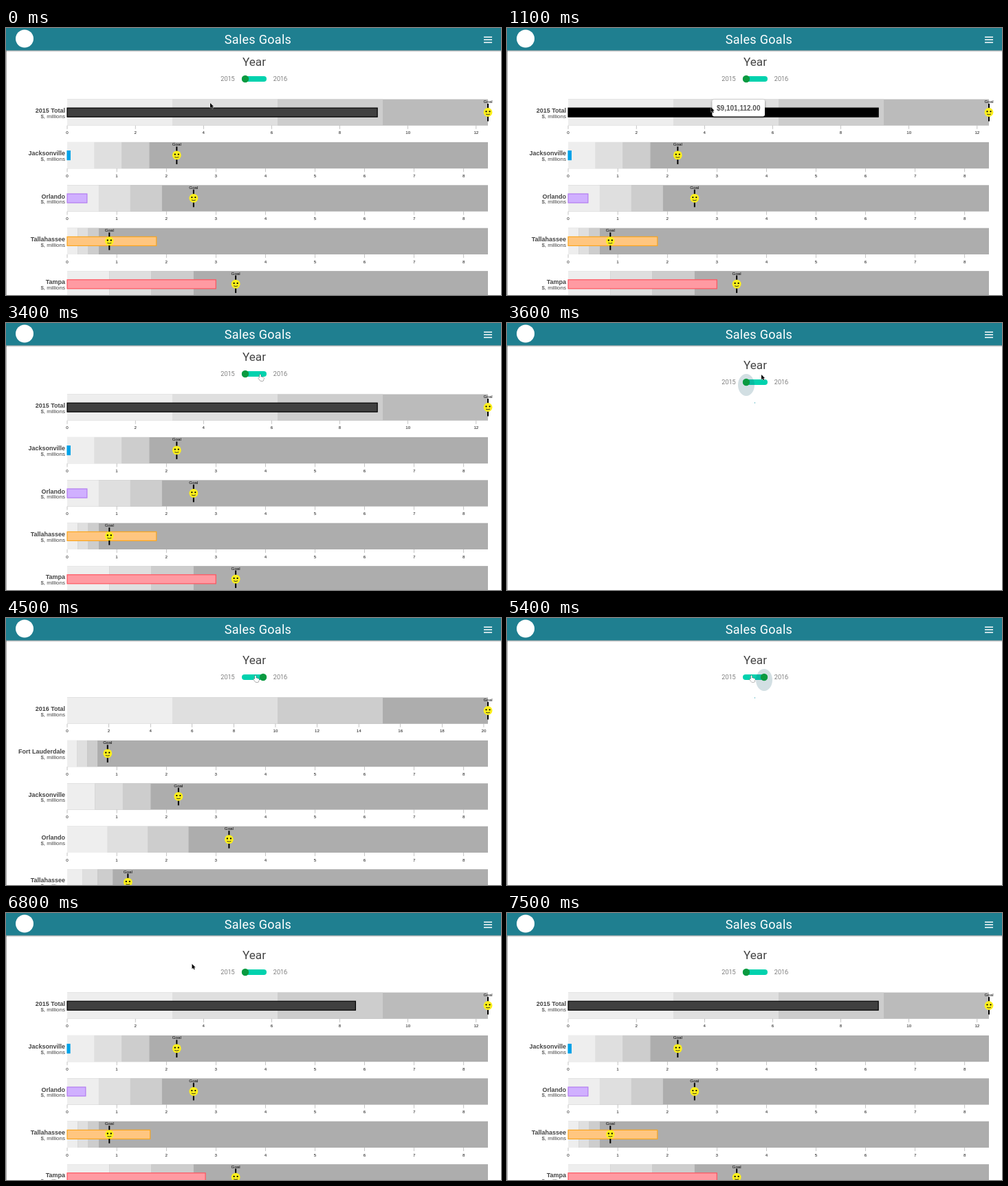
Write an HTML page that moves like this. It is 720x388 px and loops after 7600 ms.

```html
<!DOCTYPE html>
<html lang="en">
<head>
<meta charset="utf-8">
<title>Sales Goals</title>
<style>
  html, body { margin: 0; width: 100%; height: 100%; overflow: hidden; background: #fff; }
  svg { display: block; width: 720px; height: 388px; }
  text { font-family: "Liberation Sans", Arial, sans-serif; }
  .roboto { font-family: Roboto, sans-serif; }
  .mid { text-anchor: middle; }
  .end { text-anchor: end; }
  .name { font-size: 9px; font-weight: bold; fill: #444; }
  .unit { font-size: 8px; fill: #444; }
  .tick { font-size: 6.2px; fill: #111; }
  .tip { font-size: 10px; font-weight: bold; fill: #555; }
</style>
</head>
<body>
<svg viewBox="0 0 720 388">
  <defs>
    <linearGradient id="shade" x2="0" y2="1">
      <stop stop-color="#000" stop-opacity=".4"/>
      <stop offset="1" stop-color="#000" stop-opacity="0"/>
    </linearGradient>
    <filter id="lift" x="-20%" y="-40%" width="140%" height="200%">
      <feDropShadow dx="0" dy="1" stdDeviation="1.6" flood-opacity=".55"/>
    </filter>
  </defs>
  <g id="page"></g>
  <rect y="33" width="1" height="355" fill="#aaa"/>
  <rect y="32" width="720" height="3" fill="url(#shade)"/>
  <rect width="720" height="32.5" fill="#1f7f90"/>
  <circle cx="27" cy="15.5" r="13" fill="#fff"/>
  <text class="roboto mid" x="366.5" y="22.5" font-size="18" letter-spacing=".3" fill="#fff">Sales Goals</text>
  <path d="M695 13.3h12M695 17.1h12M695 20.9h12" stroke="#fff" stroke-width="1.5"/>
  <g id="pointer"></g>
</svg>
<script>
const LOOP = 7600, STEP = 100;
const LEFT = 89, WIDTH = 612, PITCH = 62.4, CITY_UNIT = 72.1;
const BANDS = ['#eee', '#dfdfdf', '#cdcdcd'];
const page = document.getElementById('page');
const pointer = document.getElementById('pointer');

const COLORS = {
  total: ['#404040', '#000'],
  Jacksonville: ['#00a2e8', '#00a2e8'],
  Orlando: ['#d0b0ff', '#b27cf0'],
  Tallahassee: ['#ffc680', '#fba51f'],
  Tampa: ['#ff9aa2', '#ff5560'],
};

// Each row: name, goal, sales (in millions)
const YEARS = {
  2015: [['2015 Total', 12.345678, 9.101112], ['Jacksonville', 2.21, .06],
    ['Orlando', 2.55, .4], ['Tallahassee', .85, 1.8], ['Tampa', 3.4, 3]],
  2016: [['2016 Total', 20.2, 0], ['Fort Lauderdale', .815, 0],
    ['Jacksonville', 2.245, 0], ['Orlando', 3.265, 0], ['Tallahassee', 1.225, 0]],
};

// Cursor path: time, x, y
const PATH = [[0, 297, 109], [500, 297, 109], [800, 296.5, 115], [1500, 296.5, 115],
  [2200, 700, 122], [2800, 700, 122], [3300, 370, 75], [3600, 370, 75], [4000, 363, 84],
  [5200, 363, 84], [5900, 286, 83], [6600, 286, 83], [7300, 120, -14], [LOOP, 120, -14]];

// Toggle clicks: when the page empties, when the new chart shows
const LOADS = [{ from: 3500, to: 4300 }, { from: 5300, to: 6000 }];
const GROW = 6060, GROW_TIME = 1000;

const clamp = v => Math.max(0, Math.min(1, v));
const ease = v => v < .5 ? 4 * v ** 3 : 1 - 4 * (1 - v) ** 3;
const rect = (x, y, w, h, fill, extra = '') =>
  `<rect x="${x}" y="${y}" width="${w}" height="${h}" fill="${fill}" ${extra}/>`;
const text = (cls, x, y, str, extra = '') =>
  `<text class="${cls}" x="${x}" y="${y}" ${extra}>${str}</text>`;

function cursorAt(t) {
  const i = PATH.findIndex(p => p[0] > t);
  const [t0, x0, y0] = PATH[i - 1], [t1, x1, y1] = PATH[i];
  const k = ease((t - t0) / (t1 - t0));
  return { x: x0 + (x1 - x0) * k, y: y0 + (y1 - y0) * k };
}

function goalMarker(x, y) {
  return text('mid', x, y + 5.5, 'Goal', 'font-size="6.2"') +
    rect(x - 1, y + 6.5, 2, 25.5, '#000') +
    `<g transform="translate(${x} ${y + 19})"><circle r="6.4" fill="#fdf01c"/>
      <circle cx="-2.5" cy="-1.2" r="1.15"/><circle cx="2.5" cy="-1.2" r="1.15"/>
      <path d="M-3 2.6Q0 4.2 3 2.6" fill="none" stroke="#222" stroke-width=".9"/></g>`;
}

function chartRow([name, goal, sales], i, top, grown, hover) {
  const total = i === 0, y = top + i * PITCH;
  const unit = total ? WIDTH / goal : CITY_UNIT, quarter = goal * unit / 4;
  let out = rect(LEFT, y, WIDTH, 38.3, name === '2015 Total' ? '#bbb' : '#adadad');
  BANDS.forEach((c, n) => out += rect(LEFT + n * quarter, y, quarter, 38.3, c));
  for (let v = 0; v * unit <= WIDTH; v += total ? 2 : 1) {
    const x = LEFT + v * unit;
    out += rect(x - .25, y + 38.3, .5, 5, '#888') + text('tick mid', x, y + 50.8, v);
  }
  out += text('name end', 86, y + 19.2, name) + text('unit end', 86, y + 27, '$, millions');
  const w = sales * unit * grown;
  if (w > 0) {
    const [fill, line] = COLORS[total ? 'total' : name];
    out += rect(LEFT, y + 12.7, w, 13, hover && total ? '#000' : fill, `stroke="${line}" stroke-width="1.2"`);
  }
  return out + goalMarker(LEFT + goal * unit, y);
}

function toggle(y, knob, ripple) {
  const halo = ripple.alpha > 0
    ? `<ellipse cx="${ripple.x}" cy="${y + 4}" rx="12" ry="16" fill="#1f5f75" opacity="${ripple.alpha}"/>` : '';
  const label = 'font-size="9.2" font-weight="300" fill="#444"';
  return text('roboto mid', 361, y - 19.5, 'Year', 'font-size="17.2" fill="#444"') +
    text('roboto mid', 322.5, y + 3.4, '2015', label) + text('roboto mid', 399, y + 3.4, '2016', label) +
    rect(343, y - 4, 36, 8, '#00d2ae', 'rx="4"') + halo +
    `<circle cx="${348 + 26 * knob}" cy="${y}" r="5.2" fill="#0a9a40"/>`;
}

function spinner(age) {
  const r = 12, a = Math.min(5, .06 + age / 130), spin = age * .15;
  return `<path d="M0 ${-r}A${r} ${r} 0 ${a > Math.PI ? 1 : 0} 1 ${r * Math.sin(a)} ${-r * Math.cos(a)}"
    transform="translate(360 128) rotate(${spin})" fill="none" stroke="#1495a8" stroke-width="1.4"/>`;
}

function tooltip({ x, y }, str, w) {
  const left = Math.min(x + 2, 718 - w);
  return rect(left, y - 11, w, 24.5, '#fff', 'rx="3" filter="url(#lift)"') +
    text('tip mid', left + w / 2, y + 4.6, str);
}

function cursor({ x, y }, hand) {
  const shape = hand
    ? 'M-1.2 0q1.2-1.2 1.9 0v3.1l3.4.8q1.3.5.9 2l-.8 3.1h-4.3l-3-4q.3-1.3 1.9-.2z'
    : 'M0 0v7.2l1.7-1.5 1.2 2.6 1.2-.6-1.1-2.5h2.2z';
  return `<path d="${shape}" transform="translate(${x} ${y})" fill="${hand ? '#fff' : '#000'}"
    stroke="${hand ? '#222' : '#fff'}" stroke-width=".7" paint-order="stroke"/>`;
}

function draw(t) {
  const [first, second] = LOADS;
  const scrolled = t < first.from, drop = scrolled ? 0 : 12;
  const load = LOADS.find(l => t >= l.from && t < l.to);
  const year = t >= first.to && t < second.from ? 2016 : 2015;
  const grown = scrolled ? 1 : ease(clamp((t - GROW) / GROW_TIME));
  const knob = clamp((t - 3650) / 200) - clamp((t - 5400) / 200);
  const ripple = {
    x: load === second ? 374 : 348,
    alpha: load ? .2 * clamp((load.from + 450 - t) / 300) : 0,
  };
  const at = cursorAt(t);
  const overChart = scrolled && at.y > 114 && at.y < 131;
  const overBar = overChart && at.x < 540, overGoal = overChart && at.x > 693;
  const hand = at.x > 343 && at.x < 379 && Math.abs(at.y - 74 - drop) < 6;

  page.innerHTML = toggle(74 + drop, knob, ripple) + (load
    ? spinner(Math.max(0, t - load.from - 100))
    : YEARS[year].map((row, i) => chartRow(row, i, 103.5 + drop, grown, overBar)).join(''));
  pointer.innerHTML =
    (overBar ? tooltip(at, '$9,101,112.00', 76.5) : '') +
    (overGoal ? tooltip(at, '$12,345,678.00', 82) : '') + cursor(at, hand);
}

const start = performance.now();
let shown = -1;
function frame() {
  const t = Math.floor((performance.now() - start) % LOOP / STEP) * STEP;
  if (t !== shown) draw(shown = t);
  requestAnimationFrame(frame);
}
frame();
</script>
</body>
</html>
```
